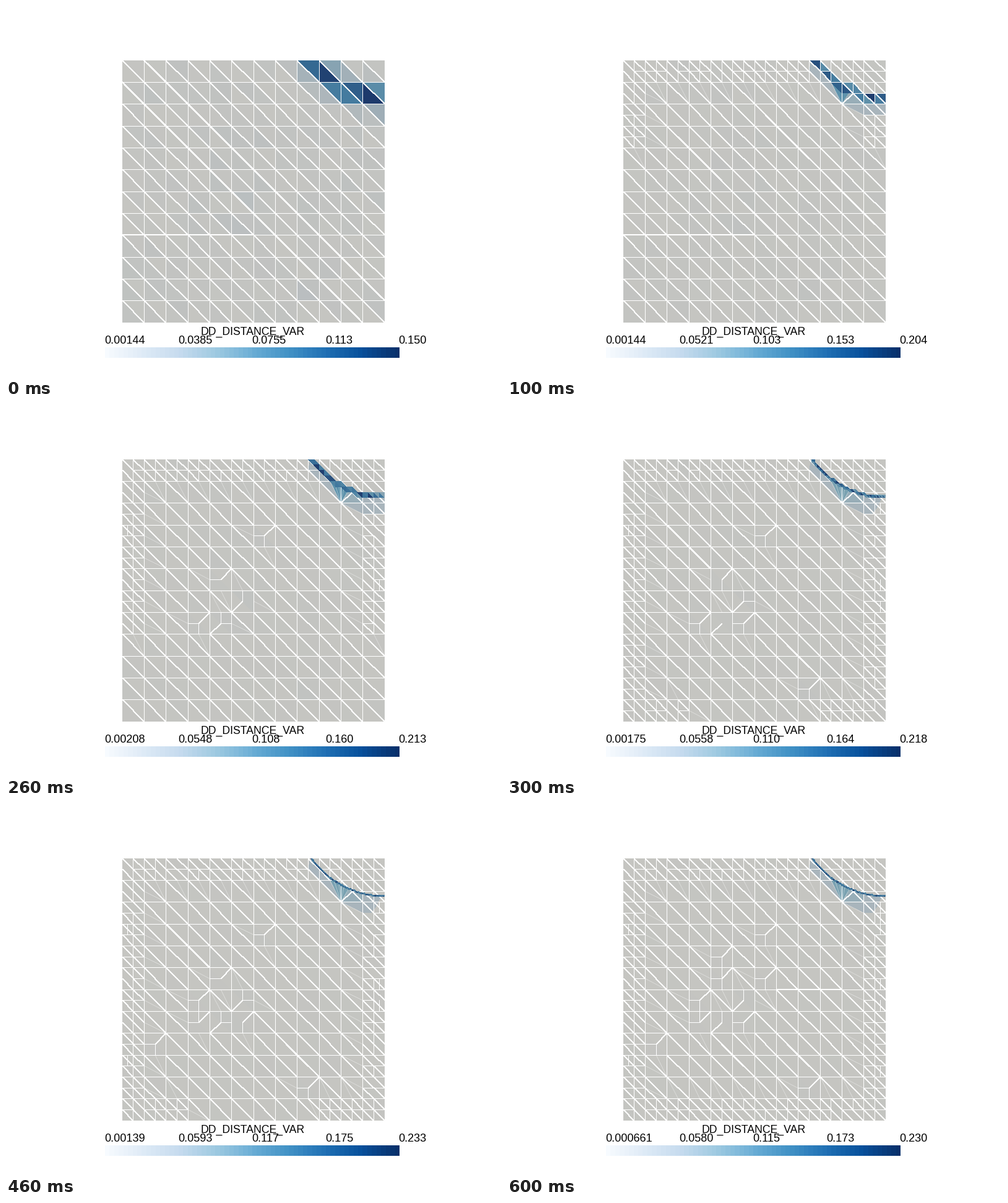
A matplotlib script that plays this animation: 800x600 px, repeating every 700 ms.

```python
import itertools
import math
import numpy as np
import matplotlib.pyplot as plt
from matplotlib.animation import FuncAnimation
from matplotlib.collections import LineCollection, PolyCollection
from matplotlib.colors import LinearSegmentedColormap

W, H, DPI = 800, 600, 100
PX = 72 / DPI
STEPS = 7
N, X0, Y0, CELL = 12, 188, 88, 424 / 12
CX, CY, R = 612, 4, 145  # the arc the mesh refines towards

LABELS = [
    "0.00144 0.0385 0.0755 0.113 0.150",
    "0.00144 0.0521 0.103 0.153 0.204",
    "0.00208 0.0548 0.108 0.160 0.213",
    "0.00175 0.0558 0.110 0.164 0.218",
    "0.00139 0.0593 0.117 0.175 0.233",
    "0.000658 0.0579 0.115 0.172 0.229",
    "0.000661 0.0580 0.115 0.173 0.230",
]
SHADES = LinearSegmentedColormap.from_list(
    "shades", ["#c4c4c1", "#a2b0b8", "#5e90aa", "#3a729a", "#1d3a6c"])

# Single refined triangles: (column, row, upper) -> first step
SOLO = {(6, 3, 0): 2, (4, 5, 0): 2, (5, 6, 1): 2, (3, 7, 0): 2, (4, 7, 1): 2,
        (5, 7, 0): 3, (8, 10, 0): 3, (3, 6, 0): 4, (1, 8, 0): 4,
        (6, 5, 0): 5, (4, 4, 0): 6}

# Heavier grid lines: steps shown, then both ends in cells
HEAVY = [
    (range(1), (1, 0), (12, 11)), (range(1), (0, 1), (11, 12)),
    (range(2), (0, 8), (6, 8)), (range(1, 2), (6, 2), (12, 8)),
    (range(1, 2), (2, 3), (11, 12)), (range(2, 3), (5, 8), (9, 12)),
    (range(2, 7), (9, 2), (10, 3)), (range(3, 7), (6, 7), (9, 10)),
    (range(3, 6), (2, 3), (4, 5)), (range(5, 7), (4, 8), (6, 10)),
    (range(5, 7), (7, 6), (10, 6)),
]

TRIS = list(itertools.product(range(N), range(N), (0, 1)))


def tri(i, j, up):
    return [(i, j), (i + 1, j) if up else (i, j + 1), (i + 1, j + 1)]


def mid(a, b):
    return ((a[0] + b[0]) / 2, (a[1] + b[1]) / 2)


def to_px(p):
    return (X0 + p[0] * CELL, Y0 + p[1] * CELL)


def snap(p):
    return tuple(math.floor(v + .01) + .5 for v in to_px(p))


def from_arc(p):
    return math.hypot(p[0] - CX, p[1] - CY) - R


def arc_y(x):
    return CY + math.sqrt(R * R - (CX - x) ** 2)


def red_tris(k):
    """Triangles split in four at step k: border strip plus single ones."""
    if k == 0:
        return set()
    depth = min(4 * k, N)
    corner = 3 if k < 5 else N
    cells = {(i, 0) for i in range(N)}
    cells |= {(i, j) for i in (0, N - 1) for j in range(depth)}
    if depth == N:
        cells |= {(i, N - 1) for i in range(N) if min(i, N - 1 - i) < corner}
    red = {(i, j, up) for i, j in cells for up in (0, 1)} | {(10, 1, 1)}
    return red | {t for t, first in SOLO.items() if first <= k}


def edges(k):
    """Red-green refinement: split edges, then close the neighbours."""
    red = red_tris(k)
    cut = {mid(a, b) for t in red
           for a, b in itertools.combinations(tri(*t), 2)}
    bare = {mid(tri(*t)[0], tri(*t)[2]) for t in red & SOLO.keys()}
    outer, inner = set(), set()
    for t in TRIS:
        a, b, c = tri(*t)
        found = []
        for p, q, far in ((a, c, b), (a, b, c), (b, c, a)):
            m = mid(p, q)
            if m in cut:
                found.append((m, far))
            on_rim = any(p[n] == q[n] and p[n] in (0, N) for n in (0, 1))
            if m not in bare and not on_rim:
                outer.add((p, q))
        if len(found) == 3:
            pairs = itertools.combinations([m for m, _ in found], 2)
            inner |= {(p, q) for p, q in pairs
                      if t not in SOLO or p[0] == q[0] or p[1] == q[1]}
        elif found:
            inner.add(found[0])
            if len(found) == 2:
                inner.add((found[0][0], found[1][0]))
    return outer, inner


def slope(a, b):
    dx, dy = abs(a[0] - b[0]), abs(a[1] - b[1])
    if min(dx, dy) == 0:
        return "flat"
    return "diagonal" if dx == dy else "steep"


def gaps(lines):
    """Some short axis-parallel edges stay unseen in the border strip."""
    rng = np.random.default_rng(3)
    return [e for e in sorted(lines)
            if slope(*e) != "flat" or rng.random() > .2]


def ticks_in_rim(k):
    """Short extra strokes near the sides, more of them at later steps."""
    rng = np.random.default_rng(11)
    out = []
    for _ in range(2 * max(k - 1, 0)):
        x = rng.choice([.25, N - .25])
        y = rng.integers(4, 2 * N - 4) / 2
        out.append(((x, y), (x, y + .5)))
    return out


def ground(k):
    rng = np.random.default_rng(7)
    fade = 1 / (1 + k)
    polys, cols = [], []
    for t in TRIS:
        pts = [to_px(p) for p in tri(*t)]
        s = fade * (min(abs(rng.normal(0, 3)), 7) + 6 * (t in SOLO))
        c = (np.array([197, 197, 193]) - s * np.array([1, .6, .1])) / 255
        if k == 0:
            near = math.exp(-(abs(from_arc(np.mean(pts, 0))) / 18) ** 1.5)
            if near > .05:
                c = SHADES(near)[:3]
        polys.append(pts)
        cols.append(c)
    return polys, cols


def band(k):
    """Small triangles cut by the arc, darker the closer they sit to it."""
    n = 2 ** min(k, 4)
    polys, cols = [], []
    for i, j, up in itertools.product(range(8 * n, N * n),
                                      range(2 * n), (0, 1)):
        pts = [to_px((x / n, y / n)) for x, y in tri(i, j, up)]
        d = [from_arc(p) for p in pts]
        if min(d) < 0 < max(d):
            near = 1 - abs(sum(d) / 3) / (CELL / n)
            polys.append(pts)
            cols.append(SHADES(.2 + .8 * near ** 2))
    return polys, cols


def glow(k):
    """Pale wedge outside the arc with a stronger fan around one vertex."""
    hub = to_px((10, 2))
    rim = [(x, arc_y(x)) for x in range(606, 492, -6)]
    end = [(612, 176), (612, 150)] if k < 3 else [(590, 176), (598, 165)]
    wedge = [(491, 91), (489, 105), (506, 123), hub, (577, 175)] + end + rim
    fan = [hub] + [(x, arc_y(x)) for x in range(523, 557, 4)]
    side = [hub, (555, arc_y(555)), (577, arc_y(577)), (577, 158)]
    return ([wedge, fan, side],
            ["#a9b5bc", "#5e93ac" if k < 3 else "#7aa2b1", "#98aeb8"])


fig = plt.figure(figsize=(W / DPI, H / DPI), dpi=DPI, facecolor="white")
ax = fig.add_axes([0, 0, 1, 1])
ax.imshow(np.linspace(0, 1, 64)[None, :], cmap="Blues", aspect="auto",
          extent=(160, 636, 569, 552), interpolation="nearest")
ax.set_xlim(0, W)
ax.set_ylim(H, 0)
ax.axis("off")
FONT = dict(family="Liberation Sans", color="black", va="baseline")
ax.text(399, 531.5, "DD_DISTANCE_VAR", size=17.6 * PX, ha="center", **FONT)
ticks = [ax.text(159.5 + 118.8 * n, 546.5, "", size=18.2 * PX, ha="left",
                 **FONT) for n in range(5)]
drawn = []


def show(coll):
    coll.set_snap(False)
    drawn.append(ax.add_collection(coll, autolim=False))


def fill(polys, cols, z):
    show(PolyCollection(polys, facecolors=cols, edgecolors="none",
                        antialiased=False, zorder=z))


def rule(segs, width=1, shift=0, **style):
    segs = [[(x - shift, y - shift) for x, y in s] for s in segs]
    opts = dict(antialiased=False, capstyle="butt", zorder=3) | style
    show(LineCollection(segs, colors="white", linewidths=width * PX, **opts))


def update(k):
    while drawn:
        drawn.pop().remove()
    for text, label in zip(ticks, LABELS[k].split()):
        text.set_text(label)
    fill(*ground(k), 1)
    if k:
        fill(*glow(k), 2)
        fill(*band(k), 2.5 if k == 1 else 4)

    outer, inner = edges(k)
    kinds = {"flat": [], "diagonal": [], "steep": []}
    for a, b in list(outer) + gaps(inner) + ticks_in_rim(k):
        kinds[slope(a, b)].append((snap(a), snap(b)))
    if k > 1:
        kinds["steep"] += [(snap((10, 2)), (x, arc_y(x)))
                           for x in range(530, 555, 8)]
    rule(kinds["flat"])
    rule(kinds["diagonal"], .72)
    rule(kinds["steep"], .8, antialiased=True, alpha=.8,
         linestyles=[(0, (1.6, 1.2))])

    heavy = [(a, b) for steps, a, b in HEAVY if k in steps]
    for kind, width in (("flat", 2), ("diagonal", 1.4)):
        rule([(snap(a), snap(b)) for a, b in heavy if slope(a, b) == kind],
             width, shift=.5)
    return drawn + ticks


anim = FuncAnimation(fig, update, frames=STEPS, interval=100, repeat=True,
                     repeat_delay=0, init_func=lambda: [], blit=False)
plt.show()
```
